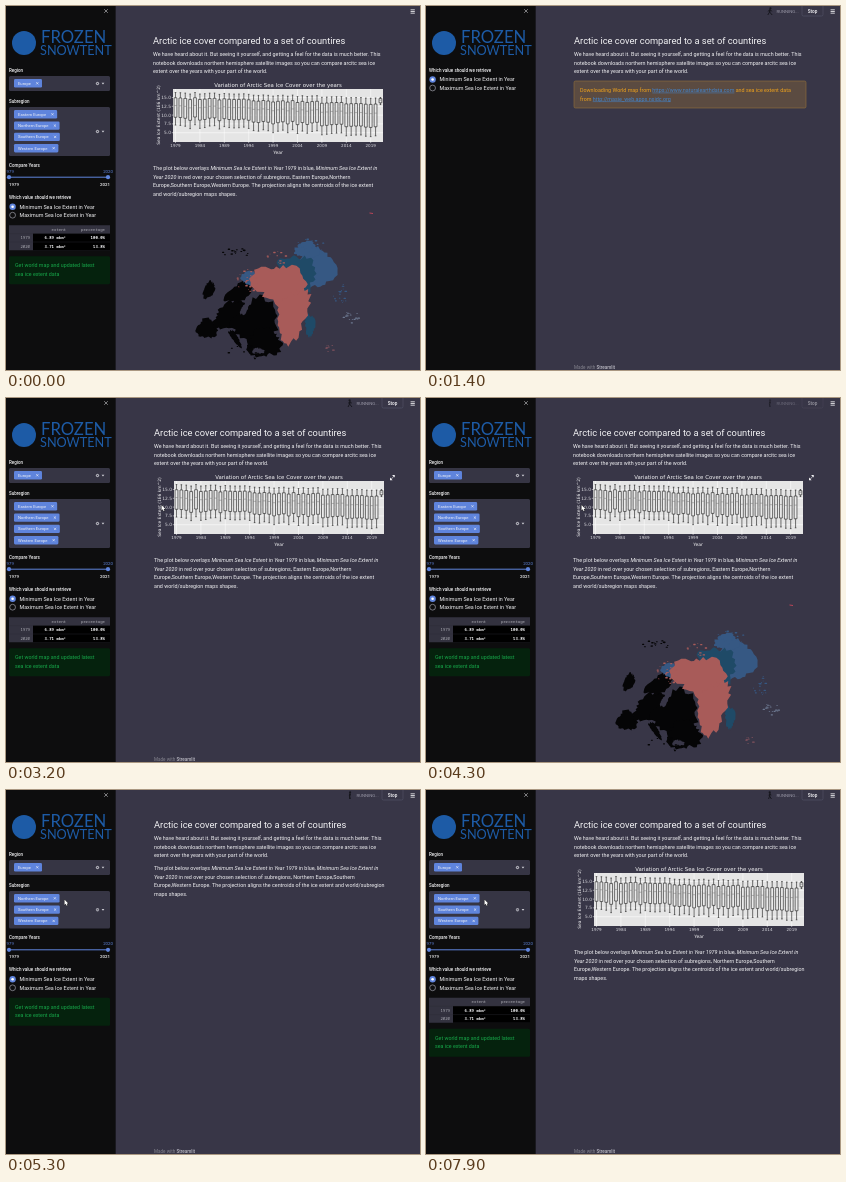
Animation, 414 px wide and 364 px high, one loop 8 s. Source, as an HTML page with a canvas:

```html
<!DOCTYPE html>
<html lang="en">
<head>
<meta charset="utf-8">
<title>Arctic ice cover</title>
<style>
html, body { margin: 0; width: 100%; height: 100%; overflow: hidden; background: #383647; }
canvas { display: block; width: 414px; height: 364px; }
</style>
</head>
<body>
<canvas id="stage"></canvas>
<script>
const LOOP = 8000, W = 414, H = 364;
const canvas = document.getElementById('stage');
const ctx = canvas.getContext('2d');
const ratio = window.devicePixelRatio || 1;
canvas.width = W * ratio;
canvas.height = H * ratio;

const SANS = 'Roboto, sans-serif', PLOT = '"DejaVu Sans", sans-serif', MONO = '"Noto Sans Mono", monospace';
const WHITE = '#f4f4f6', BLUE = '#5f84dc', LOGO = '#1d5ba6', PAGE = '#383647', FIELD = '#363544';
const REGIONS = ['Eastern Europe', 'Northern Europe', 'Southern Europe', 'Western Europe'];
const BOLD = { style: '500' };

// What the page shows at each moment of its two runs
function stageAt(t) {
  if (t < 500) return 'map';
  if (t < 900) return 'stale';
  if (t < 1900) return 'cleared';
  if (t < 2700) return 'intro';
  if (t < 4100) return 'plot';
  if (t < 4800) return 'map';
  if (t < 5200) return 'stale';
  return t < 6300 ? 'intro' : 'plot';
}

const mix = (a, b, k) => a + (b - a) * k;
const progress = (t, from, to) => Math.min(1, Math.max(0, (t - from) / (to - from)));
const ease = k => k * k * (3 - 2 * k);
const noise = n => { const s = Math.sin(n * 127.1 + 11.7) * 43758.5453; return s - Math.floor(s); };

function text(str, x, mid, size, color = WHITE, { font = SANS, align = 'left', style = '' } = {}) {
  ctx.font = `${style} ${size}px ${font}`;
  ctx.textAlign = align;
  ctx.fillStyle = color;
  ctx.fillText(str, x, mid + size * 0.36);
  return ctx.measureText(str).width;
}

// Parts between asterisks are italic
function paragraph(rows, x, y) {
  rows.forEach((row, r) => {
    let tx = x;
    row.split('*').forEach((part, i) => {
      tx += text(part, tx, y + r * 8.45, 5.36, WHITE, { style: i % 2 ? 'italic' : '' });
    });
  });
}

function box(x, y, w, h, fill, radius = 0, border) {
  ctx.beginPath();
  ctx.roundRect(x, y, w, h, radius);
  ctx.fillStyle = fill;
  ctx.fill();
  if (border) { ctx.strokeStyle = border; ctx.lineWidth = 0.6; ctx.stroke(); }
}

function line(x1, y1, x2, y2, color, width = 0.6) {
  ctx.beginPath();
  ctx.moveTo(x1, y1);
  ctx.lineTo(x2, y2);
  ctx.strokeStyle = color;
  ctx.lineWidth = width;
  ctx.stroke();
}

function shape(path, color, border) {
  const p = new Path2D(path);
  if (border) { ctx.strokeStyle = border; ctx.lineWidth = 0.8; ctx.stroke(p); }
  ctx.fillStyle = color;
  ctx.fill(p);
}

function disc(x, y, r, fill, border) {
  ctx.beginPath();
  ctx.arc(x, y, r, 0, 7);
  if (fill) { ctx.fillStyle = fill; ctx.fill(); }
  if (border) { ctx.strokeStyle = border; ctx.lineWidth = 0.7; ctx.stroke(); }
}

function cross(x, y, r, color) {
  line(x - r, y - r, x + r, y + r, color);
  line(x - r, y + r, x + r, y - r, color);
}

function select(y, h, chips) {
  box(3, y, 101, h, FIELD, 1.5);
  chips.forEach((name, i) => {
    const mid = y + 7.3 + i * 11.3;
    ctx.font = `4.2px ${SANS}`;
    const w = ctx.measureText(name).width;
    box(8, mid - 4.2, w + 15, 8.4, BLUE, 1.3);
    text(name, 12, mid, 4.2);
    cross(18.3 + w, mid, 1.1, WHITE);
  });
  const mid = y + h / 2;
  disc(91.5, mid, 1.7, '#a9a9b2');
  cross(91.5, mid, 0.6, FIELD);
  shape(`M95.6 ${mid - 0.8}h2.8l-1.4 1.7z`, '#d0d0d6');
}

function slider(y) {
  text('Compare Years', 3, y, 4.5, WHITE, BOLD);
  text('1979', 3, y + 6, 4.3, BLUE, { align: 'center' });
  text('2020', 102, y + 6, 4.3, BLUE, { align: 'center' });
  line(3, y + 12, 102, y + 12, BLUE, 1);
  disc(3, y + 12, 2.1, BLUE);
  disc(102, y + 12, 2.1, BLUE);
  text('1979', 3, y + 19, 4.4, WHITE, BOLD);
  text('2021', 104, y + 19, 4.4, WHITE, { align: 'right', ...BOLD });
}

function radios(y) {
  text('Which value should we retrieve', 3, y, 4.5, WHITE, BOLD);
  disc(6.6, y + 9.5, 3.2, BLUE);
  disc(6.6, y + 9.5, 1.3, '#fff');
  disc(6.6, y + 18, 2.9, null, '#a0a0aa');
  text('Minimum Sea Ice Extent in Year', 13.5, y + 9.5, 5.36);
  text('Maximum Sea Ice Extent in Year', 13.5, y + 18, 5.36);
}

function table(y) {
  box(3, y, 101, 25, '#33323f');
  box(27, y + 8.3, 77, 16.7, '#000');
  const rows = [['', 'extent', 'percentage'], ['1979', '6.89 mkm²', '100.0%'], ['2020', '3.71 mkm²', '53.8%']];
  rows.forEach((row, r) => {
    const mid = y + 4.2 + r * 8.4;
    [24, 60, 99].forEach((x, c) => text(row[c], x, mid, 4, r && c ? WHITE : '#b0b0b8',
      { font: MONO, align: 'right', style: r && c ? 'bold' : '' }));
    if (r) line(3, mid - 4.2, 104, mid - 4.2, '#2c2c34', 0.4);
  });
}

function sidebar(stage, regions) {
  box(0, 0, 109.5, H, '#0d0d0e');
  cross(100, 5, 1.8, '#c8c8cc');
  disc(18, 37, 12, LOGO);
  text('FROZEN', 35, 31.2, 16.7, LOGO, { font: 'Lato, sans-serif' });
  text('SNOWTENT', 34, 44.2, 12.7, LOGO, { font: 'Lato, sans-serif' });
  let y = 64;
  if (stage !== 'stale' && stage !== 'cleared') {
    const h = 3.4 + regions.length * 11.4;
    text('Region', 3, 64, 4.5, WHITE, BOLD);
    select(70, 15, ['Europe']);
    text('Subregion', 3, 95.5, 4.5, WHITE, BOLD);
    select(101, h, regions);
    slider(h + 110.2);
    y = h + 142.2;
  }
  radios(y);
  y += 28;
  if (stage === 'plot' || stage === 'map') { table(y); y += 31; }
  if (stage !== 'cleared') {
    box(3, y, 101, 28, '#05220d', 1.5);
    text('Get world map and updated latest', 9, y + 9, 5.3, '#17a84a');
    text('sea ice extent data', 9, y + 17.7, 5.3, '#17a84a');
  }
}

function link(str, x, mid) {
  const w = text(str, x, mid, 5.36, '#4386cf');
  line(x, mid + 2.6, x + w, mid + 2.6, '#4386cf', 0.5);
  return w;
}

function warning(x, y) {
  const amber = '#f0a31c';
  box(x, y, 232, 27, '#5b4b41', 1.5, '#94713a');
  let tx = x + 6;
  tx += text('Downloading World map from ', tx, y + 9.3, 5.36, amber);
  tx += link('https://www.naturalearthdata.com', tx, y + 9.3);
  text(' and sea ice extent data', tx, y + 9.3, 5.36, amber);
  tx = x + 6;
  tx += text('from ', tx, y + 18, 5.36, amber);
  link('http://masie_web.apps.nsidc.org', tx, y + 18);
}

// One box per year: the ice shrinks slowly, its summer minimum fastest
function boxPlot(i, cx, yOf) {
  const lastYear = i === 42, wobble = noise(i) - 0.5, ink = '#181818';
  const max = lastYear ? 15 : 16.3 - 0.035 * i + wobble * 0.5;
  const min = lastYear ? 13 : 6.9 - 0.068 * i + wobble * 1.3;
  const [low, q1, median, q3, high] = [0, 0.24, 0.6, 0.84, 1].map(k => yOf(mix(min, max, k)));
  line(cx, high, cx, low, ink);
  for (const end of [high, low]) line(cx - 0.8, end, cx + 0.8, end, ink);
  box(cx - 1.4, q3, 2.8, q1 - q3, '#ebebeb', 0, ink);
  line(cx - 1.4, median, cx + 1.4, median, '#777', 0.5);
}

function chart(x, top, hover) {
  ctx.save();
  ctx.translate(x - 147, top - 75);
  const plot = { font: PLOT, align: 'center' };
  text('Variation of Arctic Sea Ice Cover over the years', 272, 79, 5.4, WHITE, plot);
  box(167, 83, 210, 53, '#e5e5e5');
  const yOf = v => 91.5 + (15 - v) * 3.52, xOf = i => 169.5 + i * 4.88;
  for (let v = 5; v <= 15; v += 2.5) {
    line(165.8, yOf(v), 377, yOf(v), '#fff', 0.5);
    text(v.toFixed(1), 165, yOf(v), 4.4, '#d8d8de', { font: PLOT, align: 'right' });
  }
  for (let i = 0; i < 43; i += 5) {
    line(xOf(i), 83, xOf(i), 137, '#fff', 0.5);
    text(1979 + i, xOf(i), 140, 4.1, '#d8d8de', plot);
  }
  for (let i = 0; i < 43; i++) boxPlot(i, xOf(i), yOf);
  text('Year', 272, 146, 4.5, WHITE, plot);
  ctx.save();
  ctx.translate(152, 109);
  ctx.rotate(-Math.PI / 2);
  text('Sea Ice Extent (1E6 km^2)', 0, 0, 4.4, WHITE, plot);
  ctx.restore();
  if (hover) {
    line(384, 81.4, 387.5, 77.6, WHITE);
    shape('M385 77h2.7v2.6zM383 79.6v2.6h2.6z', WHITE);
  }
  ctx.restore();
}

function note(x, y, allRegions) {
  paragraph([
    'The plot below overlays *Minimum Sea Ice Extent in Year 1979* in blue, *Minimum Sea Ice Extent in*',
    '*Year 2020* in red over your chosen selection of subregions, ' +
      (allRegions ? 'Eastern Europe,Northern' : 'Northern Europe,Southern'),
    ...(allRegions
      ? ['Europe,Southern Europe,Western Europe. The projection aligns the centroids of the ice extent',
         'and world/subregion maps shapes.']
      : ['Europe,Western Europe. The projection aligns the centroids of the ice extent and world/subregion',
         'maps shapes.'])
  ], x, y + 3.4);
}

// Ellipse with a ragged coastline
function blob(color, cx, cy, rx, ry, tilt = 0) {
  ctx.save();
  ctx.translate(cx, cy);
  ctx.rotate(tilt);
  ctx.beginPath();
  for (let i = 0; i < 44; i++) {
    const a = i / 44 * 2 * Math.PI;
    const r = 1 + 0.12 * Math.sin(3 * a + cx) + 0.28 * (noise(cx + cy + i) - 0.5);
    ctx.lineTo(Math.cos(a) * r * rx, Math.sin(a) * r * ry);
  }
  ctx.fillStyle = color;
  ctx.fill();
  ctx.restore();
}

// Islands and broken ice scattered in an ellipse
function specks(color, count, cx, cy, rx, ry) {
  for (let i = 0; i < count; i++) {
    const seed = cx + cy + i, a = noise(seed) * 6.28, d = Math.sqrt(noise(seed + 50)), r = 0.5 + noise(seed + 99);
    box(cx + Math.cos(a) * d * rx, cy + Math.sin(a) * d * ry, r * 1.8, r, color, 0.4);
  }
}

function map(dy) {
  const land = '#050506', deep = '#1f4a67', ice = '#365883', red = '#a85b59';
  ctx.save();
  ctx.translate(0, dy);
  blob(land, 203, 284, 5, 9, 0.4);
  blob(land, 201, 323, 10, 10);
  blob(land, 226, 309, 20, 12, -0.4);
  blob(land, 250, 317, 22, 24);
  blob(land, 258, 337, 17, 14);
  blob(land, 235, 285, 18, 8, -0.7);
  blob(land, 229, 332, 3, 10, -0.6);
  blob(PAGE, 239, 302, 3, 8, 0.5);
  blob(PAGE, 252, 345, 6, 3);
  specks(land, 16, 228, 246, 16, 5);
  specks(land, 14, 240, 346, 22, 7);

  blob(ice, 309, 262, 19, 20);
  blob(ice, 301, 244, 12, 8);
  blob(deep, 291, 269, 18, 21, -0.4);
  blob(deep, 304, 319, 5, 11);
  blob(ice, 243, 272, 8, 7);
  specks(ice, 18, 304, 239, 15, 7);
  specks(ice, 18, 333, 288, 7, 13);
  specks('#6c7890', 18, 344, 311, 9, 6);

  blob(red, 275, 279, 27, 20, 0.3);
  blob(red, 287, 309, 14, 27, 0.3);
  specks(red, 24, 240, 276, 11, 13);
  specks(red, 12, 270, 252, 11, 7);
  specks('#81525d', 8, 322, 343, 5, 6);
  line(363.5, 207, 367, 207.5, '#c8475a', 0.9);
  ctx.restore();
}

function status(t) {
  ctx.save();
  ctx.globalAlpha = t < 500 ? 0 : t < 4700 ? 1 - progress(t, 4100, 4500) : 1;
  const swing = Math.sin(t * 0.019) * 2.2, ink = '#17171e';
  disc(344 + swing * 0.2, 2.3, 1.1, ink);
  line(344, 3.4, 343.6, 6, ink, 1.5);
  for (const side of [-swing, swing]) {
    line(343.6, 6, 344 + side, 9, ink, 1);
    line(344, 3.8, 344 + side, 5.3, ink, 0.8);
  }
  text('RUNNING...', 350.5, 5.3, 4.3, '#9a99a8');
  box(376, -2, 21, 12, PAGE, 1.5, '#57566a');
  text('Stop', 386.5, 5, 4.7, WHITE, { align: 'center', ...BOLD });
  ctx.restore();
}

function mainPage(stage, t) {
  const hasMap = stage === 'map' || stage === 'stale', x = hasMap ? 147 : 148;
  box(109.5, 0, W, H, PAGE);
  text('Arctic ice cover compared to a set of countires', x, 34.5, 9.3);
  paragraph([
    'We have heard about it. But seeing it yourself, and getting a feel for the data is much better. This',
    'notebook downloads northern hemisphere satellite images so you can compare arcitc sea ice',
    'extent over the years with your part of the world.'
  ], x, 48.2);
  let y = 75;
  if (stage === 'stale' || stage === 'cleared') { warning(x, y); y += 33; }
  if (hasMap || stage === 'plot') {
    chart(x, y, (t >= 300 && t < 500) || (t >= 2700 && t < 4500));
    y += 84;
  }
  if (stage !== 'cleared') note(x, y, t < 5200);
  if (hasMap) map(y - 159);
  else {
    const w = text('Made with ', 148, 361, 4.6, '#85848f');
    text('Streamlit', 148 + w, 361, 4.6, '#b9b8c2', BOLD);
  }
  for (let i = 0; i < 3; i++) line(404.6, 3.8 + i * 1.7, 408.8, 3.8 + i * 1.7, WHITE, 0.8);
  status(t);
}

// Sidebar to chart, then back to the first chip and a little aside
function pointer(t) {
  if (t < 100 || (t >= 500 && t < 2700)) return;
  const toChart = ease(progress(t, 100, 300)), toChip = ease(progress(t, 4400, 4600));
  const aside = ease(progress(t, 4600, 4800)), down = progress(t, 5000, 5300);
  ctx.save();
  ctx.translate(mix(mix(42, 155.5, toChart), 46, toChip) + 12.5 * aside, mix(188, 107, toChart) + 2.5 * down);
  shape('M0 0v5.4l1.2-1.1 .9 1.9 .9-.4-.8-1.9h1.6z', '#fff', '#111');
  ctx.restore();
}

const start = performance.now();
function tick() {
  const t = Math.floor((performance.now() - start) % LOOP / 100) * 100;
  const stage = stageAt(t);
  ctx.setTransform(ratio, 0, 0, ratio, 0, 0);
  mainPage(stage, t);
  sidebar(stage, t < 4700 ? REGIONS : REGIONS.slice(1));
  pointer(t);
  requestAnimationFrame(tick);
}
tick();
</script>
</body>
</html>
```
